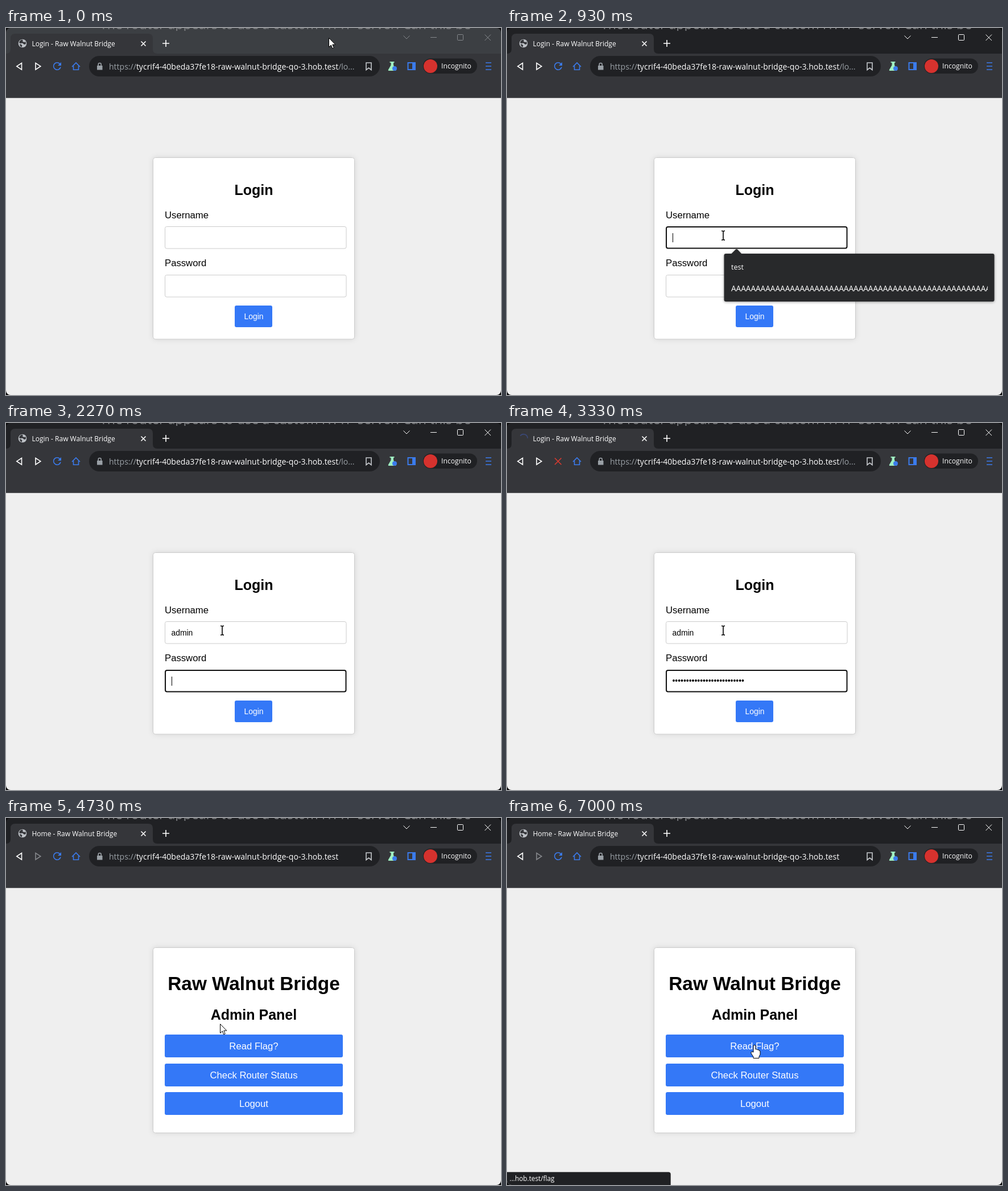
Animation, 870 px wide and 644 px high, one loop 8 s. Source, as an HTML page:

```html
<!DOCTYPE html>
<html lang="en">
<head>
<meta charset="utf-8">
<title>Router login</title>
<style>
html, body { margin: 0; width: 100%; height: 100%; overflow: hidden; background: #0b0b0c; }
svg { display: block; width: 870px; height: 644px; }
text { white-space: pre; }
.ui { font-family: "Open Sans", "Noto Sans", sans-serif; fill: #fff; }
.page { font-family: "Liberation Sans", Arial, sans-serif; fill: #000; }
.mid { text-anchor: middle; }
.bold { font-weight: 700; }
.line { fill: none; stroke-width: 1.6; }
.blue { stroke: #3b7bec; }
.white { stroke: #fff; }
.btn { fill: #3478f7; }
.onbtn { fill: #fff; text-anchor: middle; }
.field { fill: #fff; }
.card { fill: #fff; stroke: #ccc; filter: drop-shadow(0 0 5px rgba(0,0,0,.1)); }
</style>
</head>
<body>
<svg viewBox="0 0 870 644">
  <defs>
    <clipPath id="winClip"><rect width="870" height="644" rx="8"/></clipPath>
    <clipPath id="topClip"><rect width="870" height="5"/></clipPath>
    <clipPath id="listClip"><rect x="390" y="400" width="455" height="76"/></clipPath>
  </defs>

  <g clip-path="url(#winClip)">
    <rect id="bar" width="870" height="46"/>
    <g clip-path="url(#topClip)">
      <text class="ui" x="165" y="2" font-size="23.1" style="fill:#7d7f82">The router appears to use a custom HTTP server. Can this be</text>
    </g>
    <path fill="#35363a" d="M0 45q8 0 8-8V18q0-8 8-8H250q8 0 8 8V37q0 8 8 8H870V122H0z"/>
    <rect y="122" width="870" height="1" fill="#5b5c5f"/>
    <rect y="123" width="870" height="521" fill="#efefef"/>

    <!-- tab strip -->
    <g id="globe">
      <circle cx="29" cy="27" r="7.3" fill="#bdc1c6"/>
      <path fill="#35363a" d="M24 23l3-2.500 3 .5-1 2.500 3 1.500 2.500 -1 .5 4-3 1-3-2.500-4 .5-2-1zM24 28l3 1 1.500 2-1 2.500q-3-1-3.500-5.500z"/>
    </g>
    <path id="spin" class="line" stroke-width="1.8" d="M31.500 20.200A7.200 7.200 0 0 1 31.500 33.800"/>
    <text id="tab" class="ui" x="45.500" y="31.500" font-size="12"></text>
    <path class="line white" d="M237.500 23.500l8 8m0-8l-8 8"/>
    <path class="line white" stroke-width="2" d="M275 27h12m-6-6v12"/>
    <g id="winBtns" fill="none" stroke-width="1">
      <path d="M698.500 13.500l5.500 5.500 5.500-5.500M746 16.500h11M841.500 11.500l10.500 10.500m0-10.500l-10.500 10.500"/>
      <rect x="793.500" y="11.500" width="10" height="10" rx="1"/>
    </g>

    <!-- toolbar -->
    <path class="line white" d="M27.500 61.500v11.500L18.800 67.200z"/>
    <path id="fwd" class="line" d="M52 61.500v11.500L60.800 67.200z"/>
    <g id="reload">
      <path class="line blue" d="M95 63.300A6.300 6.300 0 1 0 96 68.500"/>
      <path fill="#3b7bec" d="M97 60v6h-6z"/>
    </g>
    <path id="stop" class="line" stroke="#d93a30" d="M84 61.500l11.500 11.500m0-11.500L84 73"/>
    <path class="line blue" d="M116 68l7-7 7 7M118.500 66.500V73.300h9V66.500"/>
    <rect x="146" y="49" width="511" height="36" rx="18" fill="#202124"/>
    <path fill="#9aa0a6" d="M160 66h9.500v7.500h-9.500z"/>
    <path class="line" stroke="#9aa0a6" stroke-width="1.500" d="M162.200 66v-2a2.500 2.500 0 0 1 5 0v2"/>
    <text class="ui" x="181" y="72.500" font-size="14.050"><tspan fill="#9aa0a6">https://</tspan>tycrif4-40beda37fe18-raw-walnut-bridge-qo-3.hob.test<tspan id="path" fill="#9aa0a6">/lo...</tspan></text>
    <path class="line" stroke="#c4c7cb" stroke-width="1.500" d="M633 61h9v12.500l-4.500-3.500-4.500 3.500z"/>
    <path fill="#a0f0c2" d="M674.500 59h8v1.800h-1.500v4.500l4.500 7.700q.5 2-1.500 2h-10.500q-2.500 0-1.500-2l4.500-7.700v-4.500h-2z"/>
    <circle cx="683" cy="71" r="4" fill="#3b7bec"/>
    <path fill="#3b7bec" d="M705.500 60h14.500v14h-14.500zM707.500 62v10h6.500v-10z" fill-rule="evenodd"/>
    <rect x="733" y="53.500" width="95" height="26.500" rx="13.200" fill="#202124"/>
    <circle cx="746" cy="67" r="12" fill="#d6322e"/>
    <text class="ui" x="765" y="71" font-size="12.200">Incognito</text>
    <path class="line blue" stroke-width="1.800" d="M843 61h10m-10 6h10m-10 6h10"/>

    <!-- login page -->
    <g id="login">
      <rect class="card" x="258.500" y="227.500" width="354" height="318.500" rx="4"/>
      <text class="page mid bold" x="435.500" y="293" font-size="25">Login</text>
      <text class="page" x="279" y="334" font-size="16.700">Username</text>
      <text class="page" x="279" y="418" font-size="16.700">Password</text>
      <rect id="userBox" class="field"/>
      <rect id="passBox" class="field"/>
      <text id="user" class="page" x="290.500" y="372.500" font-size="13.900"></text>
      <text id="pass" class="page" x="290.500" y="457" font-size="13.900"></text>
      <rect id="caret" width="1" height="16"/>
      <rect class="btn" x="402" y="487" width="66" height="38" rx="3"/>
      <text class="page onbtn" x="435.500" y="511" font-size="13.900">Login</text>
    </g>

    <!-- admin page -->
    <g id="admin">
      <rect class="card" x="258.500" y="227.500" width="354" height="325" rx="4"/>
      <text class="page mid bold" x="435.500" y="302" font-size="33.350">Raw Walnut Bridge</text>
      <text class="page mid bold" x="435.500" y="354" font-size="25">Admin Panel</text>
      <g id="links"></g>
    </g>

    <!-- autofill list -->
    <g id="list" style="filter:drop-shadow(0 1px 2px rgba(0,0,0,.4))">
      <path fill="#28292b" d="M385 396H394.500L402 388.500q1.500-1 3 0L412 396H853.500q3 0 3 3V477q0 3-3 3H385q-3.500 0-3.500-3V399q0-3 3.500-3z"/>
      <g clip-path="url(#listClip)">
        <text class="ui" x="394" y="424" font-size="12.600">test</text>
        <text id="longName" class="ui" x="394" y="461.500" font-size="13.600"></text>
      </g>
    </g>

    <!-- status bubble -->
    <g id="status">
      <path fill="#202124" stroke="#000" stroke-opacity=".3" d="M-1 621.500H284q3.500 0 3.500 3.500V645H-1z"/>
      <text class="ui" x="4.500" y="637" font-size="11.800">...hob.test/flag</text>
    </g>
  </g>

  <!-- pointers -->
  <path id="arrow" fill="#fff" stroke="#000" d="M.5.5V16.500L4.300 13 6.700 18.800 9.200 17.700 6.800 12.100H11.800z"/>
  <path id="beam" class="line" stroke="#000" stroke-width="1.300" d="M-3-8q3 0 3 1.500q0-1.500 3-1.500M0-7V7M-3 8q3 0 3-1.500q0 1.500 3 1.500"/>
  <path id="hand" fill="#fff" stroke="#000" stroke-linejoin="round" d="M-2 13V2Q-2 .5 0 .5T2 2V8Q4.500 6.500 5 8.800Q7.500 7.800 8 10Q10 9.500 10 12V17L8 20.500V23.500H-2V21L-6 15Q-6.500 12-4.500 12Z"/>
</svg>
<script>
const LOOP = 8000, RATE = 15;
const el = {};
document.querySelectorAll("[id]").forEach(e => el[e.id] = e);

const set = (e, attrs) => { for (const k in attrs) e.setAttribute(k, attrs[k]); };
const show = (e, on) => e.setAttribute("visibility", on ? "visible" : "hidden");
const label = (e, s) => { if (e.textContent !== s) e.textContent = s; };
const clamp = v => Math.min(1, Math.max(0, v));
const smooth = k => k * k * k * (10 - 15 * k + 6 * k * k);
const bezier = (a, b, c, d, u) => {
  const v = 1 - u;
  return v * v * v * a + 3 * v * v * u * b + 3 * v * u * u * c + u * u * u * d;
};
const along = (p, u) => [0, 1].map(i => bezier(p[0][i], p[1][i], p[2][i], p[3][i], u));

const toField = [[567, 17], [560, 120], [400, 300], [380, 364]];
const toLink = [[376, 361], [640, 361], [640, 385], [435, 398]];

el.longName.textContent = "A".repeat(60);
el.links.innerHTML = ["Read Flag?", "Check Router Status", "Logout"].map((s, i) => {
  const y = Math.round(380 + i * 50.5);
  return `<rect class="btn" x="279" y="${y}" width="313" height="40" rx="3"/>
    <text class="page onbtn" x="435.5" y="${y + 25.5}" font-size="16.7">${s}</text>`;
}).join("");

function drawField(box, y, focus) {
  set(box, focus
    ? { x: 280, y: y + 1, width: 317.5, height: 37.5, rx: 3, stroke: "#101010", "stroke-width": 2 }
    : { x: 279.5, y: y + .5, width: 318.5, height: 38.5, rx: 3, stroke: "#ccc", "stroke-width": 1 });
}

function typed(n) {
  const count = n < 26 ? 0 : n < 27 ? 2 : n < 30 ? 3 : n < 32 ? 4 : 5;
  return "admin".slice(0, count);
}

function drawPointer(n) {
  let kind = "arrow", pos;
  if (n < 61) {
    pos = along(toField, smooth(clamp((n - 1) / 9)));
    if (pos[1] > 348) kind = "beam";
  } else {
    pos = along(toLink, smooth(clamp((n - 92) / 9)));
    if (pos[1] > 380) kind = "hand";
  }
  for (const k of ["arrow", "beam", "hand"]) show(el[k], k === kind);
  set(el[kind], { transform: `translate(${Math.round(pos[0])} ${Math.round(pos[1])})` });
}

function drawChrome(n, home) {
  const active = n >= 14, loading = n >= 48 && n < 71;
  set(el.bar, { fill: active ? "#202124" : "#3c3f43" });
  set(el.winBtns, { stroke: active ? "#fff" : "#85888c" });
  set(el.fwd, { stroke: home ? "#85878b" : "#fff" });
  label(el.tab, (home ? "Home" : "Login") + " - Raw Walnut Bridge");
  show(el.path, !home);
  show(el.globe, !loading);
  show(el.reload, !loading);
  show(el.spin, loading);
  show(el.stop, loading);
  set(el.spin, {
    stroke: home ? "#3b7bec" : "#3a4878",
    transform: `rotate(${(66 - n) * 18} 29 27)`
  });
}

function drawLogin(n) {
  const inPass = n >= 34, pasted = n >= 42;
  drawField(el.userBox, 348, n >= 14 && !inPass);
  drawField(el.passBox, 433, inPass);
  const name = typed(n);
  label(el.user, name);
  label(el.pass, pasted ? "•".repeat(26) : "");

  const since = n - (pasted ? 42 : inPass ? 34 : n >= 26 ? 26 : 14);
  const width = inPass ? (pasted ? 126.5 : 0) : name ? el.user.getComputedTextLength() : 0;
  set(el.caret, { x: Math.round(290.8 + width), y: inPass ? 445 : 360 });
  show(el.caret, n >= 14 && since % 15 < 8);
}

function draw(t) {
  const n = Math.floor((t + 5) * RATE / 1000);
  const home = n >= 68;
  drawChrome(n, home);
  el.login.style.display = home ? "none" : "";
  el.admin.style.display = home ? "" : "none";
  if (!home) drawLogin(n);

  // the list shrinks a little while it fades out
  const alpha = n < 14 ? 0 : clamp(1 - (n - 25) * .175);
  const fade = n < 28 ? alpha : n < 29 ? .25 : 0;
  const scale = .947 + .053 * alpha;
  set(el.list, {
    opacity: fade,
    transform: `translate(619 438) scale(${scale}) translate(-619 -438)`
  });
  set(el.status, { opacity: n < 104 ? 0 : n < 105 ? .5 : 1 });
  drawPointer(n);
}

const start = performance.now();
function tick(now) {
  draw(Math.max(0, now - start) % LOOP);
  requestAnimationFrame(tick);
}
draw(0);
requestAnimationFrame(tick);
</script>
</body>
</html>
```
